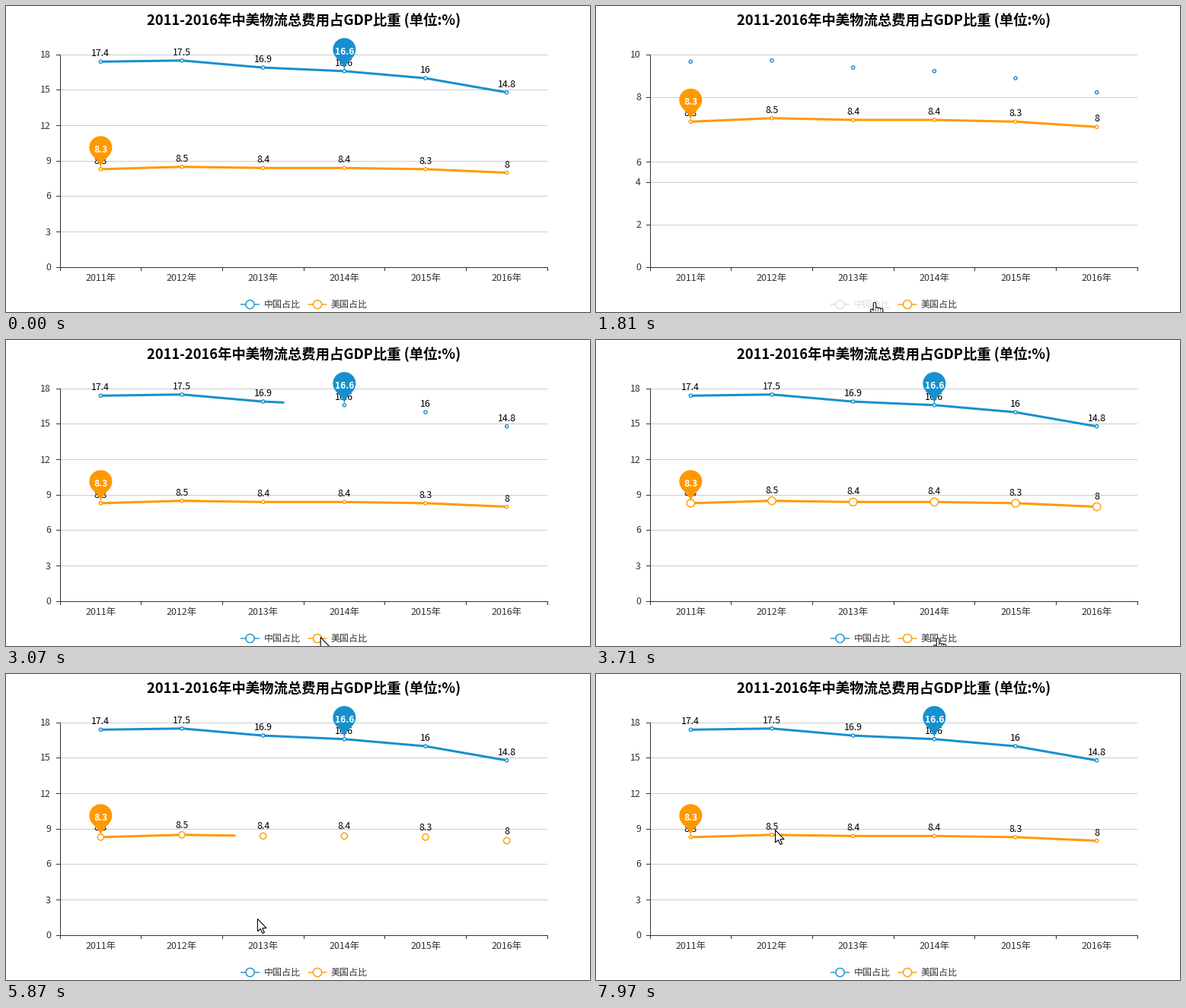
Recreate the animation shown at these times as a matplotlib script. Size 767 px wide and 403 px high, loop 8 s.

```python
import numpy as np
import matplotlib.pyplot as plt
from matplotlib.animation import FuncAnimation
from matplotlib.patches import Circle, FancyBboxPatch, PathPatch, Polygon
from matplotlib.path import Path
from matplotlib.transforms import Affine2D

W, H, DPI = 767, 403, 64
LOOP, STEP = 8000, 20
PT = 72 / DPI  # points per pixel
LEFT, RIGHT, BASE, HEIGHT = 71, 711, 344, 280
BLUE, ORANGE, DARK = "#1790cf", "#ff9900", "#333333"
EASE, FADE, REVEAL, LINGER = 300, 180, 1000, 400  # durations in ms

plt.rcParams["font.family"] = "Noto Sans CJK JP"
fig = plt.figure(figsize=(W / DPI, H / DPI), dpi=DPI, facecolor="white")
ax = fig.add_axes([0, 0, 1, 1])
ax.set(xlim=(0, W), ylim=(H, 0))
ax.axis("off")

XS = LEFT + (RIGHT - LEFT) / 6 * (np.arange(6) + 0.5)


def text(x, y, s, size=12.4, color=DARK, ha="left", **kw):
    return ax.text(x, y, s, fontsize=size * PT, color=color, ha=ha,
                   va="baseline", **kw)


def line(xs, ys, color, width=1, z=1):
    return ax.plot(xs, ys, color=color, lw=width * PT, zorder=z, snap=False,
                   solid_capstyle="butt", solid_joinstyle="round")[0]


def ring(x, y, r, color, z):
    return ax.add_patch(Circle((x, y), r, fc="white", ec=color,
                               lw=1.4 * PT, zorder=z))


def place(artist, x, y):
    artist.set_transform(Affine2D().translate(x, y) + ax.transData)


def cubic_out(p):
    return 1 - (1 - np.clip(p, 0, 1)) ** 3


def pin_path(r=15, h=50):
    """Map pin with its tip at the origin: an arc and two Bezier flanks."""
    dy = r * r / (h - r)
    cy = -h + r + dy
    a = np.arcsin(dy / r)
    dx, c1, c2 = np.cos(a) * r, r * 0.6, r * 0.7
    ang = np.linspace(np.pi - a, 2 * np.pi + a, 40)
    arc = np.column_stack([r * np.cos(ang), cy + r * np.sin(ang)])
    side, low = dx - np.sin(a) * c1, cy + dy + np.cos(a) * c1
    curves = [(side, low), (0, -c2), (0, 0), (0, -c2), (-side, low), (-dx, cy + dy)]
    codes = [Path.MOVETO] + [Path.LINETO] * 39 + [Path.CURVE4] * 6
    return Path(np.vstack([arc, curves]), codes)


class Series:
    """One line with dots, labels, pin and legend key.

    The pointer reaches the key at `hover`; clicks hide the series at `off`
    and bring it back at `on`, after which the pointer leaves.
    """

    def __init__(self, name, values, color, off_color, key_x, pin_at, hover, off, on):
        self.values, self.color, self.off_color = np.array(values), color, off_color
        self.pin_at, self.hover, self.off, self.on = pin_at, hover, off, on
        self.line = line([], [], color, 3, 3)
        self.dots = [ring(x, 0, 2, color, 4) for x in XS]
        self.labels = [text(x, 0, f"{v:g}", color="black", ha="center", zorder=5)
                       for x, v in zip(XS, values)]
        self.pin = ax.add_patch(PathPatch(pin_path(), fc=color, lw=0, zorder=6))
        self.pin_text = text(XS[pin_at], 0, f"{values[pin_at]:g}", 12, "white",
                             "center", weight="bold", zorder=7)
        self.key = line([key_x, key_x + 25], [393, 393], color, 1.4)
        self.key_dot = ring(key_x + 12.5, 393, 5.6, color, 2)
        self.key_text = text(key_x + 30.5, 397.3, name, 12)

    def update(self, t, scale):
        shown = not self.off <= t < self.on
        fading = self.off <= t < self.off + FADE
        # Dots of a switched-off series stay at their old height for a moment.
        ys = BASE - self.values * (scale if shown else HEIGHT / 18)
        grow = shown * np.clip(min(t - self.hover, self.on + LINGER - t) / 60, 0, 1)

        done = 1 if t < self.on else min((t - self.on) / REVEAL, 1)
        edge = LEFT + (RIGHT - LEFT) * done
        xs = np.minimum(XS, max(edge, XS[0]))
        self.line.set_data(xs, np.interp(xs, XS, ys))

        for dot, label, x, y in zip(self.dots, self.labels, XS, ys):
            dot.center = (x, y)
            dot.set_radius(2.1 + 3 * grow)
            dot.set_visible(shown or fading)
            label.set_y(y - 7 - 3 * grow)

        tip_x, tip_y = XS[self.pin_at], ys[self.pin_at]
        place(self.pin, tip_x, tip_y)
        self.pin_text.set_y(tip_y - 22)
        for artist in [self.line, self.pin, self.pin_text, *self.labels]:
            artist.set_visible(shown)

        color = self.color if shown else self.off_color
        self.key.set_color(color)
        self.key_dot.set_edgecolor(color)
        self.key_text.set_color(DARK if shown else self.off_color)


text(391.5, 24.3, "2011-2016年中美物流总费用占GDP比重 (单位:%)", 18.4, "black",
     "center", weight="bold")

# Axes
grid = [line([LEFT, RIGHT], [0, 0], "#cccccc") for _ in range(7)]
ticks = [line([LEFT - 5, LEFT], [0, 0], DARK, z=2) for _ in range(7)]
tick_labels = [text(59, 0, "", ha="right") for _ in range(7)]
line([LEFT + 0.5] * 2, [64, BASE + 1], DARK, z=2)
line([LEFT, RIGHT + 1], [BASE + 0.5] * 2, DARK, z=2)
for x in np.floor(np.linspace(LEFT, RIGHT, 7)) + 0.5:
    line([x, x], [BASE, BASE + 5], DARK, z=2)
for i, x in enumerate(XS):
    text(x, 362, f"{2011 + i}年", ha="center")

china = Series("中国占比", [17.4, 17.5, 16.9, 16.6, 16, 14.8], BLUE, "#dedede",
               308, pin_at=3, hover=1000, off=1730, on=2610)
usa = Series("美国占比", [8.3, 8.5, 8.4, 8.4, 8.3, 8], ORANGE, "#ccc9c4",
             396.5, pin_at=0, hover=3420, off=4800, on=5510)

# Tooltip
tooltip = [ax.add_patch(FancyBboxPatch((150, 219), 74, 44, fc=(0.2, 0.2, 0.2, 0.7),
                                       lw=0, boxstyle="round,pad=4,rounding_size=4",
                                       zorder=8)),
           text(151, 236.3, "美国占比", 14, "white", zorder=9),
           text(151, 257.3, "平均值 : 8.3", 14, "white", zorder=9)]


def hand_path():
    """Four fingers, a thumb and a palm as strokes around the fingertip."""
    strokes = [[(0, 2), (0, 17)], [(-4, 11), (0, 15)]]
    strokes += [[(3 * i, 8 + 0.6 * i), (3 * i, 17)] for i in (1, 2, 3)]
    strokes += [[(0, y), (8.5, y)] for y in (14, 16.5, 19)]
    return Path(np.vstack(strokes), [Path.MOVETO, Path.LINETO] * len(strokes))


# Pointer
arrow = ax.add_patch(Polygon([(0, 0), (0, 16.5), (3.8, 13), (6.5, 19), (9, 18),
                              (6.4, 12.2), (11.6, 12.2)], fc="white", ec="black",
                             lw=1.1 * PT, zorder=12))
hand = [ax.add_patch(PathPatch(hand_path(), fc="none", ec=color, lw=width * PT,
                               capstyle="round", zorder=z))
        for color, width, z in [("black", 4.6, 12), ("white", 2.5, 13)]]

ENTRY, CHINA_KEY, USA_KEY, PIN = (366, 402), (366, 390), (449, 392.5), (119.5, 198)
MOVES = [(820, 1000, CHINA_KEY), (china.on, 3420, USA_KEY), (usa.on, 6510, PIN),
         (7250, 7480, (246, 211)), (7830, 7960, (235.5, 205.5))]


def pointer_at(t):
    pos = np.array(ENTRY, float)
    for start, end, goal in MOVES:
        pos += (np.array(goal) - pos) * np.clip((t - start) / (end - start), 0, 1)
    return pos


def near(pos, spot):
    return np.hypot(*(pos - spot)) < 22


def update_axis(t, scale):
    values = range(0, 11, 2) if china.off <= t < china.on else range(0, 19, 3)
    final = HEIGHT / values[-1]
    for i, row in enumerate(zip(grid, ticks, tick_labels)):
        for artist in row:
            artist.set_visible(i < len(values))
        if i < len(values):
            # Only the value found on both scales slides; others appear in place.
            v = values[i]
            y = np.floor(BASE - v * (scale if v == 6 else final) + 1e-6)
            for artist in row[:2]:
                artist.set_ydata([y + 0.5] * 2)
            row[2].set_y(y + 4.5)
            row[2].set_text(str(v))


def draw(frame):
    t = frame * STEP + STEP / 2
    stretch = 1 if t >= china.off + FADE else cubic_out((t - china.off) / EASE)
    stretch -= cubic_out((t - china.on) / EASE)
    scale = HEIGHT / 18 + (HEIGHT / 10 - HEIGHT / 18) * stretch
    update_axis(t, scale)
    china.update(t, scale)
    usa.update(t, scale)

    pos = pointer_at(t)
    over_pin = near(pos, PIN)
    usa.pin.set_facecolor("#ffa800" if over_pin else ORANGE)
    for part in tooltip:
        part.set_visible(over_pin)

    pointing = any(near(pos, spot) for spot in (CHINA_KEY, USA_KEY, PIN))
    for artist in [arrow, *hand]:
        place(artist, *pos)
        artist.set_visible(t >= MOVES[0][0] and pointing == (artist is not arrow))
    return []


anim = FuncAnimation(fig, draw, frames=LOOP // STEP, interval=STEP,
                     init_func=lambda: [], repeat=True)
plt.show()
```
